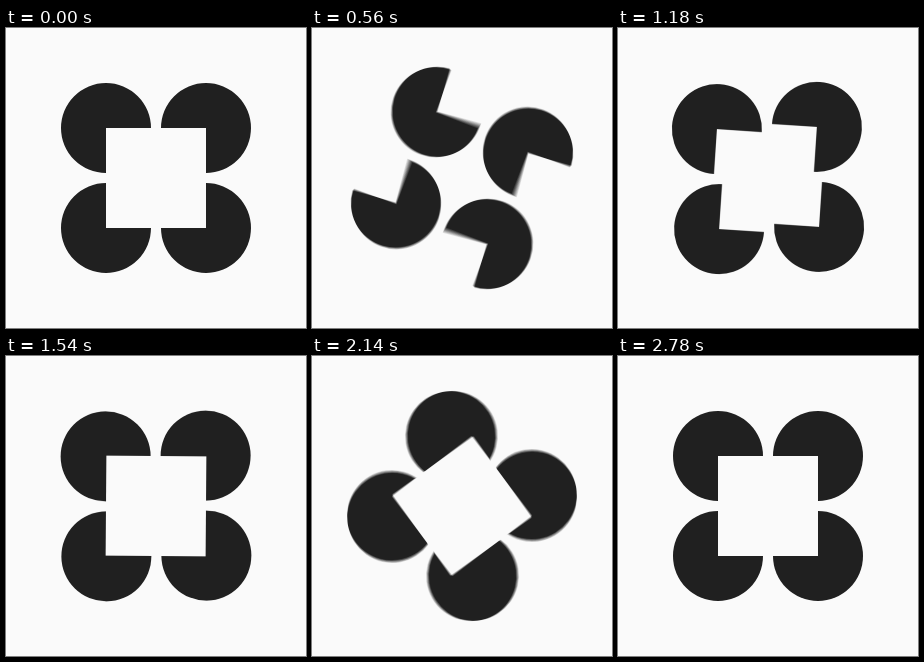
These frames come from a looping animation (300 px wide and 300 px high, 2800 ms). An HTML page without scripts:

```html
<!DOCTYPE html>
<html lang="en">
<head>
<meta charset="utf-8">
<title>Illusory square</title>
<style>
  @property --n {
    syntax: "<number>";
    inherits: true;
    initial-value: 0;
  }

  html, body {
    margin: 0;
    height: 100%;
    overflow: hidden;
    background: #fafafa;
  }

  svg {
    display: block;
    width: 100vw;
    height: 100vh;
    animation: tick 2800ms steps(140, end) -1ms infinite;
  }

  @keyframes tick {
    from { --n: 0; }
    to { --n: 140; }
  }

  /* Each layer is one sample inside the open shutter; opacity 1/(i+1) averages them. */
  .layer {
    --t: calc((var(--n) + var(--i) * .11) / 70);
    --second: clamp(0, (var(--t) - 1) * 1000000, 1);

    /* cubic ease-in-out for each half of the loop */
    --a: clamp(0, var(--t), .5);
    --b: clamp(0, 1 - var(--t), .5);
    --e1: calc(4 * var(--a) * var(--a) * var(--a) + .5 - 4 * var(--b) * var(--b) * var(--b));
    --c: clamp(0, var(--t) - 1, .5);
    --d: clamp(0, 2 - var(--t), .5);
    --e2: calc(4 * var(--c) * var(--c) * var(--c) + .5 - 4 * var(--d) * var(--d) * var(--d));

    opacity: calc(1 / (var(--i) + 1));
  }

  .paper { fill: #fafafa; }
  .ink { fill: #202020; }

  .ring { transform: rotate(calc((var(--e1) - var(--e2)) * 90deg)); }
  .pac {
    transform: rotate(calc(var(--e1) * -360deg));
    opacity: calc(1 - var(--second));
  }
  .disc { opacity: var(--second); }
  .square {
    transform: rotate(calc(var(--e2) * 90deg));
    opacity: var(--second);
  }
</style>
</head>
<body>
<svg viewBox="-150 -150 300 300">
  <defs>
    <g id="corner" class="ink">
      <path class="pac" d="M0 0H45A45 45 0 1 0 0 45Z"/>
      <circle class="disc" r="45"/>
    </g>
    <g id="scene">
      <rect class="paper" x="-150" y="-150" width="300" height="300"/>
      <g class="ring">
        <use href="#corner" transform="translate(-50 -50)"/>
        <use href="#corner" transform="rotate(90) translate(-50 -50)"/>
        <use href="#corner" transform="rotate(180) translate(-50 -50)"/>
        <use href="#corner" transform="rotate(270) translate(-50 -50)"/>
      </g>
      <rect class="square paper" x="-50" y="-50" width="100" height="100"/>
    </g>
  </defs>
  <use class="layer" href="#scene" style="--i:0"/>
  <use class="layer" href="#scene" style="--i:1"/>
  <use class="layer" href="#scene" style="--i:2"/>
  <use class="layer" href="#scene" style="--i:3"/>
  <use class="layer" href="#scene" style="--i:4"/>
  <use class="layer" href="#scene" style="--i:5"/>
  <use class="layer" href="#scene" style="--i:6"/>
  <use class="layer" href="#scene" style="--i:7"/>
</svg>
</body>
</html>
```
